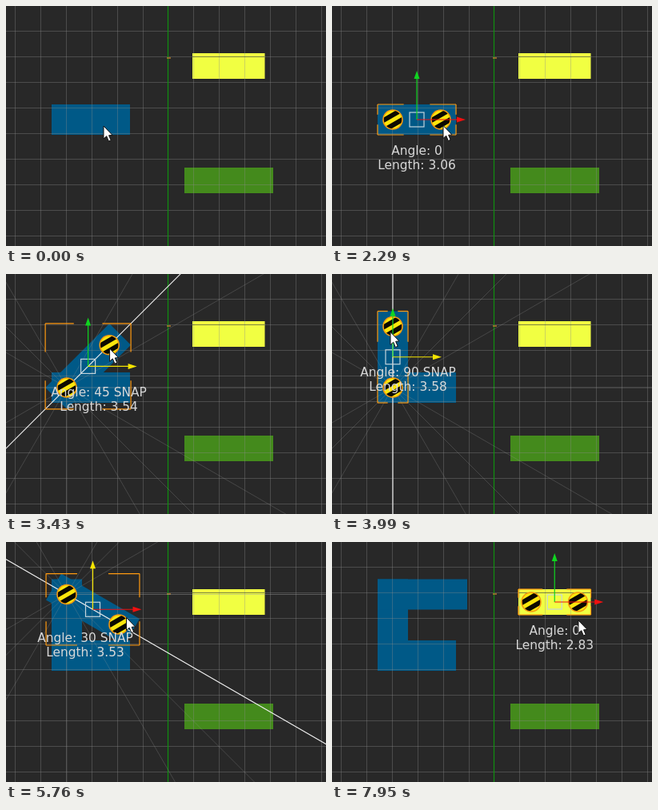
Write an HTML page with a canvas that moves like this. It is 400 px wide and 300 px high and loops after 8000 ms.

```html
<!DOCTYPE html>
<html lang="en">
<head>
<meta charset="utf-8">
<title>Block extrude tool</title>
<style>
  html, body { margin: 0; width: 100%; height: 100%; overflow: hidden; background: #282828; }
  canvas { display: block; }
</style>
</head>
<body>
<canvas id="stage" width="400" height="300"></canvas>
<script>
const ctx = document.getElementById('stage').getContext('2d');
const LOOP = 8000, UNIT = 32, RAD = Math.PI / 180;
const BLUE = '#005987', YELLOW = '#f1ff42', GREEN = '#448a1c';
const LOW = { x: 76, y: 142 }, HIGH = { x: 76, y: 65.5 };
const SNAPS = [0, 30, 45, 60, 90, 120, 135, 150, 180];

// Pointer path: time, x, y
const pointerPath = [
  [0, 122, 150], [60, 122, 150], [790, 137, 151], [1180, 139, 149.5], [2290, 139, 149.5],
  [2700, 119, 85], [2970, 135, 100], [3200, 145, 111], [3520, 126, 89],
  [3990, 73, 72.5], [4240, 73, 72.5], [5010, 80, 142], [5330, 80, 143],
  [5560, 133, 119], [5760, 150.5, 94.5], [5820, 151, 94], [6120, 154, 67], [6250, 154, 67],
  [6650, 262, 82], [7010, 262, 82], [7770, 258, 88], [7940, 308, 98], [8000, 308, 98]
];

function pointerAt(t) {
  const i = Math.max(1, pointerPath.findIndex(p => p[0] > t));
  const [t0, x0, y0] = pointerPath[i - 1], [t1, x1, y1] = pointerPath[i];
  const u = (t - t0) / (t1 - t0), e = u * u * (3 - 2 * u);
  return { x: x0 + (x1 - x0) * e, y: y0 + (y1 - y0) * e };
}

const makeBlock = (a, b, half = 19, color = BLUE, snapped = false) => {
  const dist = Math.hypot(b.x - a.x, b.y - a.y);
  return { a, b, half, color, snapped, dist, dx: (b.x - a.x) / dist, dy: (b.y - a.y) / dist };
};

// A block pulled from a pivot; its direction sticks to the nearby guide rays.
function pull(pivot, t, offsetX, offsetY) {
  const p = pointerAt(t);
  const vx = p.x - offsetX - pivot.x, vy = p.y - offsetY - pivot.y;
  let angle = Math.atan2(vy, vx) / RAD;
  const snap = SNAPS.find(s => Math.abs(Math.abs(angle) - s) < (s % 90 ? 7.5 : 9)) ??
               SNAPS.find(s => Math.abs(Math.abs(angle) - s) < 9);
  if (snap !== undefined) angle = Math.sign(angle || 1) * snap;
  const c = Math.cos(angle * RAD), s = Math.sin(angle * RAD);
  const dist = vx * c + vy * s;
  return makeBlock(pivot, { x: pivot.x + c * dist, y: pivot.y + s * dist }, 19, BLUE, snap !== undefined);
}

const base = makeBlock(LOW, { x: 136, y: 142 });
const lemon = makeBlock({ x: 249, y: 75 }, { x: 307.5, y: 75 }, 16, YELLOW);
const leaf = makeBlock({ x: 239, y: 218 }, { x: 318, y: 218 }, 16, GREEN);

function line(x1, y1, x2, y2, color, width = 1) {
  ctx.strokeStyle = color;
  ctx.lineWidth = width;
  ctx.beginPath();
  ctx.moveTo(x1, y1);
  ctx.lineTo(x2, y2);
  ctx.stroke();
}

function polygon(points, fill, stroke) {
  ctx.beginPath();
  points.forEach(([x, y]) => ctx.lineTo(x, y));
  ctx.closePath();
  ctx.fillStyle = fill;
  ctx.fill();
  if (stroke) {
    ctx.strokeStyle = stroke;
    ctx.lineWidth = 1;
    ctx.stroke();
  }
}

function drawBlock({ a, dx, dy, dist, half, color }) {
  ctx.save();
  ctx.translate(a.x, a.y);
  ctx.rotate(Math.atan2(dy, dx));
  ctx.fillStyle = color;
  ctx.fillRect(-half, -half, dist + 2 * half, 2 * half);
  ctx.restore();
}

function drawGrid() {
  const color = 'rgba(140,140,140,.36)';
  for (let i = -6; i <= 6; i++) {
    const x = Math.floor(202.9 + i * 31.9) + .5;
    if (i) line(x, 0, x, 300, color);
  }
  for (let y = 31.5; y < 300; y += UNIT) line(0, y, 400, y, color);
  line(233, 63.5, 323, 63.5, 'rgba(60,60,40,.55)');
  line(202.5, 0, 202.5, 300, '#109010', 1.2);
  line(201, 65, 206, 65, '#b07a2c', 1.5);
}

function drawGuides({ a, dx, dy }) {
  for (const s of SNAPS) {
    const c = 600 * Math.cos(s * RAD), n = 600 * Math.sin(s * RAD);
    line(a.x - c, a.y - n, a.x + c, a.y + n, 'rgba(150,150,150,.27)');
  }
  line(a.x - 600 * dx, a.y - 600 * dy, a.x + 600 * dx, a.y + 600 * dy, '#f4f4f4', 1.1);
}

function drawBrackets({ a, b, dx, dy, half }) {
  const reach = half * (Math.abs(dx) + Math.abs(dy));
  const left = Math.min(a.x, b.x) - reach, right = Math.max(a.x, b.x) + reach;
  const top = Math.min(a.y, b.y) - reach, bottom = Math.max(a.y, b.y) + reach;
  const w = (right - left) / 3, h = (bottom - top) / 3;
  for (const [x, sx] of [[left, 1], [right, -1]])
    for (const [y, sy] of [[top, 1], [bottom, -1]]) {
      line(x, y, x + sx * w, y, '#ff9a10', 1.2);
      line(x, y, x, y + sy * h, '#ff9a10', 1.2);
    }
}

function drawHandle({ x, y }) {
  ctx.save();
  ctx.translate(x, y);
  ctx.beginPath();
  ctx.arc(0, 0, 12, 0, 2 * Math.PI);
  ctx.fillStyle = '#fbe60c';
  ctx.fill();
  ctx.save();
  ctx.clip();
  ctx.rotate(-30 * RAD);
  ctx.fillStyle = '#0c0a00';
  ctx.fillRect(-13, -8, 26, 6);
  ctx.fillRect(-13, 3, 26, 6);
  ctx.restore();
  ctx.strokeStyle = '#f59a10';
  ctx.lineWidth = 1.6;
  ctx.stroke();
  ctx.restore();
}

function drawGizmo(x, y, hover) {
  const xColor = hover === 'x' ? '#f5e400' : '#f01010';
  const yColor = hover === 'y' ? '#f5e400' : '#10d420';
  ctx.strokeStyle = '#c4d4dc';
  ctx.lineWidth = 1.2;
  ctx.strokeRect(x - 9, y - 9, 18, 18);
  line(x, y, x, y - 52, yColor, 1.2);
  polygon([[x - 3.5, y - 51], [x, y - 61], [x + 3.5, y - 51]], yColor);
  line(x, y, x + 52, y, xColor, 1.2);
  polygon([[x + 50, y - 3.5], [x + 61, y], [x + 50, y + 3.5]], xColor);
}

function drawSelection(block, hover) {
  const { a, b, dx, dy, half, dist, snapped } = block;
  const x = (a.x + b.x) / 2, y = (a.y + b.y) / 2;
  drawBrackets(block);
  drawHandle(a);
  drawHandle(b);
  drawGizmo(x, y, hover);

  const angle = Math.round(Math.abs(Math.atan2(dy, dx)) / RAD);
  const textX = x - dy * half, textY = y + dx * half + 24.5;
  ctx.font = '15.4px "DejaVu Sans", sans-serif';
  ctx.textAlign = 'center';
  ctx.fillStyle = '#d8d8d8';
  ctx.fillText(`Angle: ${angle}${snapped ? ' SNAP' : ''}`, textX, textY);
  ctx.fillText(`Length: ${((dist + 2 * half) / UNIT).toFixed(2)}`, textX, textY + 18);
}

function drawPointer({ x, y }) {
  const outline = [[0, 0], [0, 16], [3.7, 12.7], [6.4, 19], [9.2, 17.8], [6.6, 11.8], [11, 11.4]];
  polygon(outline.map(([px, py]) => [x + px, y + py]), '#fff', '#111');
}

function hoverAt(t) {
  if (t >= 2320 && t < 4300) return 'x';
  if (t >= 4450 && t < 6300 || t >= 7600 && t < 7880) return 'y';
}

function draw(t) {
  const blocks = [base, lemon, leaf];
  if (t >= 2320) blocks.push(pull(LOW, Math.min(t, 4240), 3, 7));
  if (t >= 5360) blocks.push(pull(HIGH, Math.min(t, 6250), 4, 1));

  let selected = null;
  if (t >= 6720) selected = lemon;
  else if (t >= 2320) selected = blocks[blocks.length - 1];
  else if (t >= 120) selected = base;
  const dragging = t >= 2320 && t < 4240 || t >= 5360 && t < 6250;

  ctx.fillStyle = '#282828';
  ctx.fillRect(0, 0, 400, 300);
  blocks.forEach(drawBlock);
  drawGrid();
  if (dragging) drawGuides(selected);
  if (selected) drawSelection(selected, hoverAt(t));
  drawPointer(pointerAt(t));
}

function tick() {
  draw(performance.now() % LOOP);
  requestAnimationFrame(tick);
}
tick();
</script>
</body>
</html>
```
